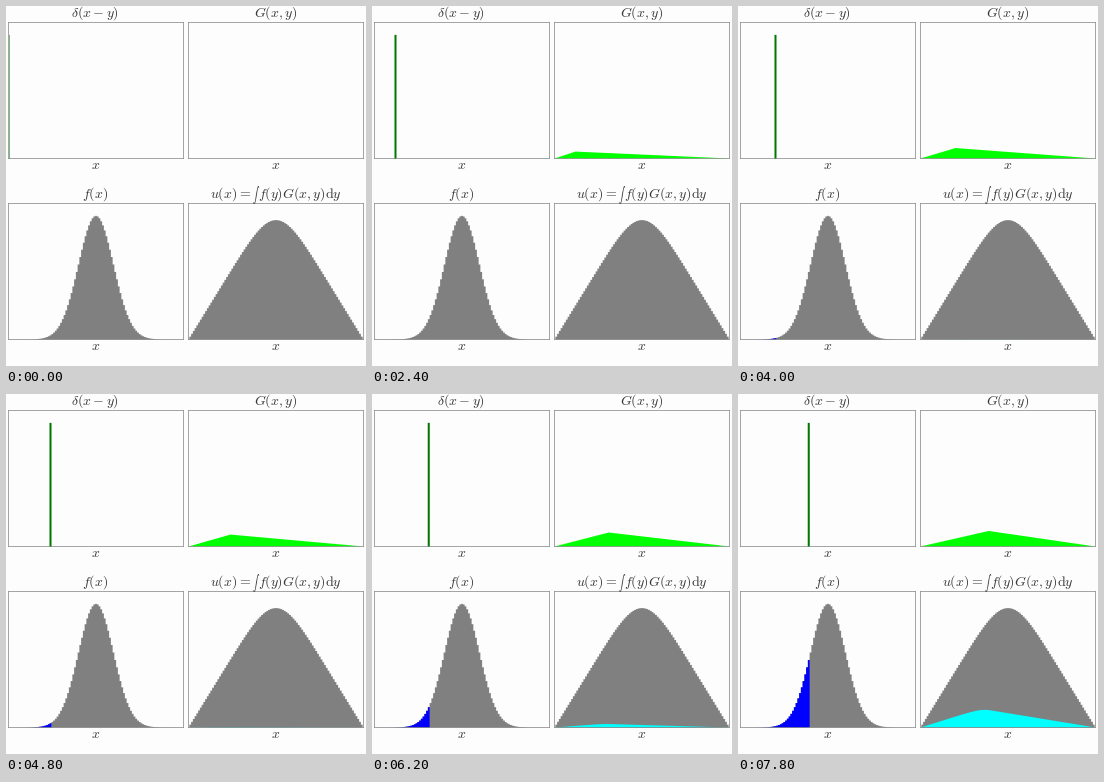
These frames come from a looping animation (360x360 px, 8 s). A matplotlib script:

```python
import numpy as np
import matplotlib.pyplot as plt
from matplotlib.animation import FuncAnimation
from matplotlib.patches import Polygon

SIZE, FRAMES, INTERVAL = 360, 40, 200
W, H = 175, 136
INK, FRAME, PAPER = "#383838", "#808080", "#fdfdfd"
plt.rcParams["mathtext.fontset"] = "cm"

x = np.arange(101) / 100
step = x[1]
edges = np.append(x, 1 + step) - step / 2
f = np.exp(-50 * (x - 0.5) ** 2)


def green(y):
    return np.minimum(x, y) * (1 - np.maximum(x, y))


def solution(n):
    """Sum of the first n weighted Green's functions."""
    return sum((f[k] * green(x[k]) * step for k in range(n)), np.zeros_like(x))


def outline(heights):
    """Corner points of adjoining bars."""
    tops = np.concatenate([[0], np.repeat(heights, 2), [0]])
    return np.column_stack([np.repeat(edges, 2), tops])


fig = plt.figure(figsize=(SIZE / 100, SIZE / 100), dpi=100, facecolor=PAPER)


def label(px, base, text, ha="center", va="baseline", size=10):
    fig.text(px / SIZE, 1 - base / SIZE, text, fontsize=size, color=INK,
             ha=ha, va=va)


def panel(left, top, ymax):
    ax = fig.add_axes([left / SIZE, 1 - (top + H) / SIZE, W / SIZE, H / SIZE],
                      facecolor=PAPER)
    ax.set(xlim=(0, 1), ylim=(0, ymax), xticks=[], yticks=[])
    for side in ax.spines.values():
        side.set(linewidth=0.5, color=FRAME, snap=False)
    label(left + W / 2, top + H + 11, "$x$")
    return ax


def bars(ax, heights, color):
    shape = Polygon(outline(heights), facecolor=color, linewidth=0, snap=False)
    return ax.add_patch(shape)


ax_d = panel(2.5, 16.5, 1.1)
ax_g = panel(182.5, 16.5, 2.08)
ax_f = panel(2.5, 197.5, 1.1)
ax_u = panel(182.5, 197.5, 0.06)

label(89.3, 11, r"$\delta(x-y)$")
label(269.5, 11, r"$G(x,y)$")
label(89.3, 192, r"$f(x)$")
label(204, 192, r"$u(x)=$", ha="left")
label(250, 188.5, r"$\int$", va="center", size=4.7)
label(336, 192, r"$f(y)G(x,y)\mathrm{d}y$", ha="right")

bars(ax_f, f, "#808080")
bars(ax_u, solution(len(x)), "#808080")
spike_w = 1.15 * step
spike = ax_d.bar([0], [1], width=spike_w, color="#007800", linewidth=0,
                 snap=False, zorder=3)[0]
g_bars = bars(ax_g, 0 * x, "#00ff00")
f_bars = bars(ax_f, 0 * x, "#0000ff")
u_bars = bars(ax_u, 0 * x, "#00ffff")


def draw(n):
    spike.set_x(x[n] - spike_w / 2)
    g_bars.set_xy(outline(green(x[n])))
    f_bars.set_xy(outline(np.where(np.arange(len(x)) <= n, f, 0)))
    u_bars.set_xy(outline(solution(n + 1)))
    return []


anim = FuncAnimation(fig, draw, frames=FRAMES, interval=INTERVAL,
                     repeat=True, repeat_delay=0)
plt.show()
```
